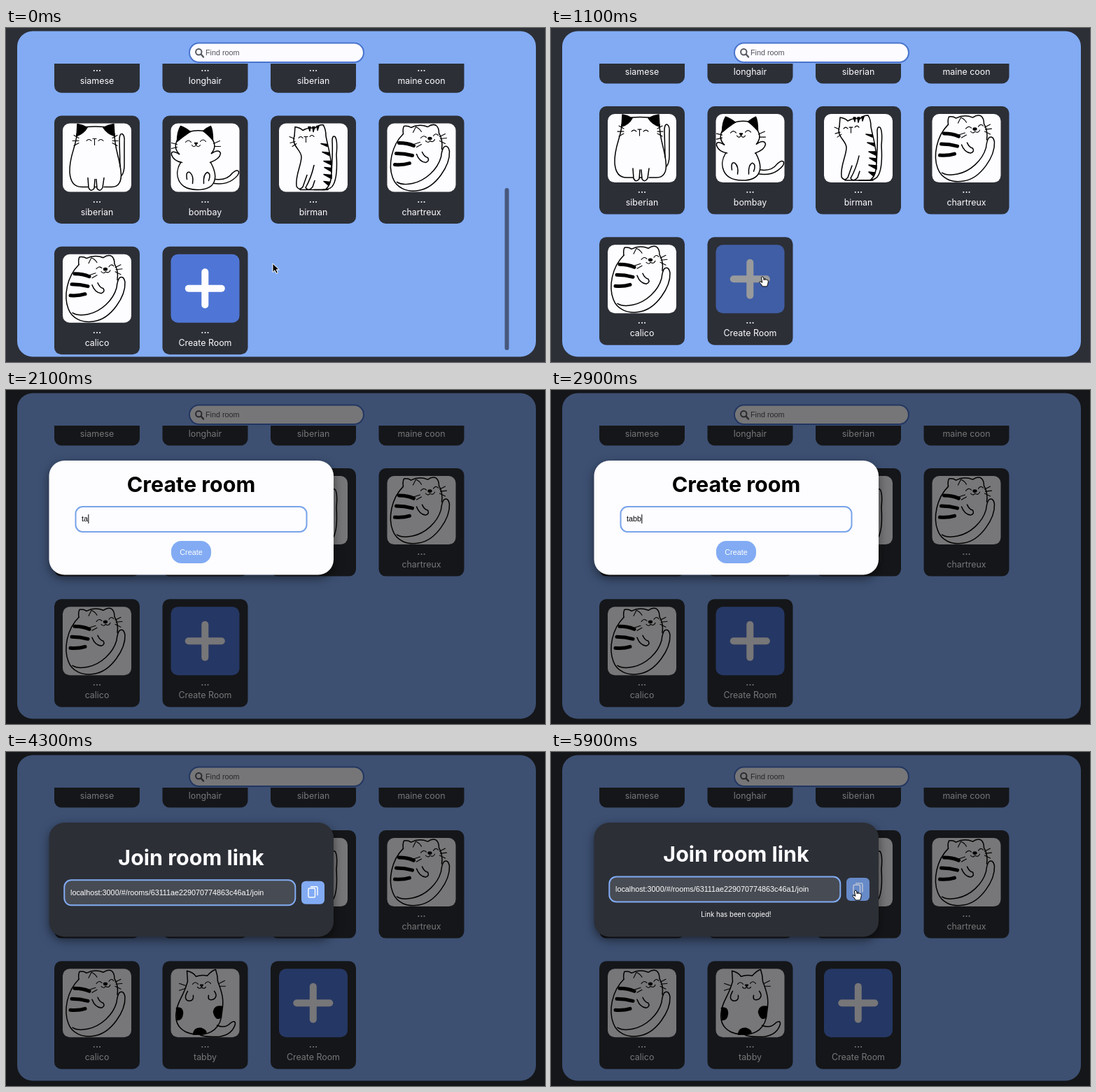
An HTML page that plays this animation: 770 px wide and 478 px high, repeating every 6 s.

```html
<!DOCTYPE html>
<html lang="en">
<head>
<meta charset="utf-8">
<title>Create room</title>
<style>
  html, body { margin: 0; width: 100%; height: 100%; overflow: hidden; background: #2c2f36; }
  svg { display: block; width: 770px; height: 478px; }
  text { white-space: pre; }
  .label { font: 400 12.4px Inter, sans-serif; fill: #fcfcff; text-anchor: middle; }
  .dots { font-weight: 700; }
  .title { font: 700 30.5px Inter, sans-serif; text-anchor: middle; }
  .field { font: 10.8px "Liberation Sans", Arial, sans-serif; }
  .note { font: 9.7px Inter, sans-serif; fill: #fff; text-anchor: middle; }
  .mid { text-anchor: middle; }
  .ink { fill: none; stroke: #000; stroke-width: 1.5; stroke-linecap: round; stroke-linejoin: round; }
  .ink .solid { fill: #000; }
  .ink .band { stroke-width: 5; }
  .ink .thin { stroke-width: 1.1; }
  .shadow { filter: drop-shadow(0 5px 7px rgba(0, 0, 0, .5)); }
</style>
</head>
<body>
<svg id="stage" viewBox="0 0 770 478" xmlns="http://www.w3.org/2000/svg"></svg>
<script>
const BLUE = '#82abf4', DARK = '#2c2f36', WHITE = '#fdfcff';
const stage = document.getElementById('stage');

const line = (d, cls = '') => `<path class="${cls}" d="${d}"/>`;
const rect = (x, y, w, h, r, fill, extra = '') =>
  `<rect x="${x}" y="${y}" width="${w}" height="${h}" rx="${r}" fill="${fill}" ${extra}/>`;
const text = (x, y, cls, str, extra = '') =>
  `<text x="${x}" y="${y}" class="${cls}" ${extra}>${str}</text>`;

// Drawings live in a 98 x 98 tile.
const cats = {
  sitting:
    line('M20 15C20 32 9 46 10 70C11 84 17 91 27 91H36M59 91H70C80 91 85 83 83 68C81 48 74 36 74 15M34 5Q46 4 59 5') +
    line('M20 18L21 1Q28 2 35 6Q30 15 20 18ZM74 18L73 1Q66 2 58 6Q64 15 74 18Z', 'solid') +
    line('M36 78L37 92Q40 99 45 93L46 80M48 80L49 93Q53 99 57 92L59 78M46 91H49') +
    line('M82 62L81 24Q81 14 85 15Q89 17 88 28V60Q88 70 84 75') +
    line('M34 25q3.5-4 7 0M51 25q3.5-4 7 0M43 22h5M45.5 22v9M23 21l-7-4M23 25h-9M23 28l-7 4M71 21l7-4M71 25h8M71 28l7 4', 'thin'),
  waving:
    line('M9 24C4 34 8 40 12 44M60 24C65 32 62 38 58 43M26 12Q36 9 48 11') +
    line('M9 26Q9 12 14 4Q22 7 28 12Q22 15 9 26ZM60 24Q60 10 57 4Q52 6 46 11Q52 15 60 24Z', 'solid') +
    line('M12 44Q0 37 1 45Q4 54 16 56M58 43Q69 36 71 43Q70 51 56 56') +
    line('M14 56C4 72 9 95 38 95C64 95 69 78 57 56') +
    line('M23 80Q21 68 27 70Q33 75 31 86M47 86Q46 73 52 70Q58 72 54 82') +
    line('M64 80Q80 82 88 71Q95 65 97 69Q98 74 88 81Q78 88 62 86') +
    line('M21 27q4-5 8 0M42 26q4-5 8 0M30 31q3 4.5 6 0q3 4.5 6 0M9 30l-8-2M9 34l-8 2M61 29l9-4M62 33h9', 'thin') +
    line('M34 28h4l-2 2.5Z', 'solid'),
  standing:
    line('M22 18L23 5Q30 6 34 10Q42 5 51 7Q56 2 63 2Q67 8 67 18C70 35 76 50 75 70Q75 88 66 95H50') +
    line('M22 18C17 32 32 38 32 48C32 60 23 74 25 90Q29 97 34 91L40 74M50 60Q46 78 38 92Q42 98 48 91L51 82M30 95H70') +
    line('M75 70Q77 40 76 25Q76 17 80 19Q84 24 82 45Q84 75 78 87Q75 95 62 95') +
    line('M42 5h3l-1 6ZM48 5h3l-2 7ZM54 4h3l-2 6Z', 'solid') +
    line('M69 30l-9-1l9 4ZM72 42l-10-1l10 5ZM74 54l-10 0l10 5ZM75 64l-10-1l10 6ZM75 74l-11-1l11 6ZM73 84l-9-1l7 6Z', 'solid') +
    line('M28 21q3-4 6 0M44 19q3-4 6 0M36 19h5M38.5 19v8M22 22l-7-3M23 26l-7 2M25 29l-6 4', 'thin'),
  curled:
    line('M23 15C6 32 1 60 8 78C13 92 28 99 45 96C70 92 90 60 89 40Q87 30 81 34Q78 38 77 48C72 66 55 82 36 86Q22 89 14 84') +
    line('M23 15Q22 8 24 4Q30 3 34 6Q46 0 58 5Q65 0 70 3Q74 6 74 14C79 22 79 30 78 37') +
    line('M42 44Q46 55 55 56Q61 54 58 49Q53 48 50 41') +
    line('M37 13l4-8q5 2 8 7M48 21q4-5 8-1M66 18q3-5 7-1M55 25q4 4 6 0q5 3 7-2M75 19l8-4M76 22l9-1M75 25l8 4M47 27l-9 3M49 30l-7 4', 'thin') +
    `<ellipse class="solid" cx="61" cy="21.5" rx="2.4" ry="1.6"/>` +
    line('M17 28Q29 28 38 32M13 43Q25 43 36 46M11 59Q23 60 32 57', 'band'),
  patched:
    line('M24 18L23 3Q32 5 36 11Q44 8 52 10Q58 3 64 1Q67 10 67 18C74 36 76 45 73 62C72 86 56 94 40 94C16 94 4 80 8 60C10 45 18 40 24 18') +
    line('M8 56Q17 54 17 64Q16 74 9 73ZM73 54Q62 52 61 62Q64 74 71 70ZM32 94Q33 84 43 85Q52 88 50 93Z', 'solid') +
    line('M24 32Q17 44 26 46Q33 46 32 38M54 38Q52 46 60 44Q68 40 62 32') +
    line('M66 81Q78 86 86 77Q92 73 92 79Q88 94 70 97Q46 98 41 94') +
    line('M31 22q4-5 8 0M49 21q4-5 8 0M38 26q3 4 6 0q3 4 6 0M21 24l-9-3M21 28l-9 3M69 21l8-4M70 25h8', 'thin') +
    line('M42 23h4l-2 2.5Z', 'solid')
};

const card = (col, row, name, art) =>
  `<g transform="translate(${69 + 154.5 * col} ${-61.7 + 187.2 * row})">
    ${rect(0, 0, 122, 154.5, 10, DARK)}
    <g transform="translate(12 11)">${art}</g>
    ${text(61, 124, 'label dots', '...')}${text(61, 142, 'label', name)}
  </g>`;
const room = (col, row, name, cat) =>
  card(col, row, name, rect(0, 0, 98, 98, 10, WHITE) + `<g class="ink">${cats[cat]}</g>`);
const adder = col => card(col, 2, 'Create Room',
  `<g class="add" fill="${WHITE}">${rect(0, 0, 98, 98, 10, '#4f76d6', 'class="tile"')}
   ${rect(20.3, 44, 57, 10, 5, 'inherit')}${rect(43.8, 20.5, 10, 57, 5, 'inherit')}</g>`);

const rooms = [
  ['siamese', 'sitting'], ['longhair', 'waving'], ['siberian', 'standing'], ['maine coon', 'curled'],
  ['siberian', 'sitting'], ['bombay', 'waving'], ['birman', 'standing'], ['chartreux', 'curled'],
  ['calico', 'curled']
].map(([name, cat], i) => room(i % 4, Math.floor(i / 4), name, cat)).join('');

stage.innerHTML = `
  <clipPath id="view"><rect x="16" y="51" width="741" height="419.5"/></clipPath>
  ${rect(0, 0, 770, 478, 0, DARK)}
  ${rect(16, 4.5, 741, 466, 22, BLUE)}
  <g clip-path="url(#view)"><g id="list">
    ${rooms}
    <g id="before">${adder(1)}</g>
    <g id="after">${room(1, 2, 'tabby', 'patched')}${adder(2)}</g>
  </g></g>
  ${rect(712.5, 229, 6, 232, 3, '#48587c', 'id="bar"')}
  ${rect(262, 21.5, 249, 27.5, 13.7, '#fcfbff', 'stroke="#4a74cc" stroke-width="2"')}
  <path d="M279 38l3 3.5" stroke="#555860" stroke-width="2.4" stroke-linecap="round"/>
  <circle cx="275.3" cy="34.3" r="4.2" fill="none" stroke="#555860" stroke-width="2"/>
  ${text(285, 39, 'field', 'Find room', 'fill="#50535a"')}
  ${rect(0, 0, 770, 478, 0, '#000', 'id="dim" opacity=".53"')}

  <g id="create">
    ${rect(61.5, 101, 406.5, 163.5, 22, '#fdfcfe', 'class="shadow"')}
    ${text(264.5, 146, 'title', 'Create room')}
    ${rect(99.5, 167, 330, 36, 10, '#fdfcff', 'stroke="#78a4ea" stroke-width="2"')}
    ${text(108, 188.3, 'field', '', 'id="entry"')}
    ${rect(0, 178, 1, 13, 0, '#000', 'id="caret"')}
    ${rect(236, 216, 57, 32, 14.5, BLUE, 'id="send"')}
    ${text(264.5, 235.8, 'field mid', 'Create', 'id="sendText"')}
  </g>

  <g id="join">
    ${rect(61.5, 101, 406.5, 163.5, 22, DARK, 'class="shadow"')}
    <g id="link">
      ${text(264.5, 162, 'title', 'Join room link', `fill="${WHITE}"`)}
      ${rect(83.3, 183.3, 330, 36, 10, '#474b53', `stroke="${BLUE}" stroke-width="2"`)}
      ${text(92, 205, 'field', 'localhost:3000/#/rooms/63111ae229070774863c46a1/join', 'fill="#fff"')}
      ${rect(422, 184.7, 33, 33, 6, BLUE, 'id="copy"')}
      <g id="copyIcon" fill="none" stroke="#fff" stroke-width="1.4" stroke-linejoin="round">
        <rect x="432" y="195" width="9.5" height="13" rx="1.5"/>
        <path d="M435 192.7h8.500q1.500 0 1.500 1.500v11"/>
      </g>
    </g>
    ${text(264.5, 235.7, 'note', 'Link has been copied!', 'id="note"')}
  </g>

  <g id="cursor" stroke-linejoin="round">
    <path id="arrow" d="M0 0V12.500L3 9.700L5 14.300L7.300 13.300L5.300 8.800H9.200Z" fill="#000" stroke="#fff"/>
    <path id="hand" d="M-1.500 1Q0-1 1.500 1L2.300 5Q4-.0 4 4.500Q6 3 6.500 5Q8.500 4 8.300 7.500Q8 11 6.500 14H0Q-1 11-4 8.500Q-4.500 6.300-2 7.200L-.3 8.500Z"
      fill="#fff" stroke="#000"/>
  </g>`;

const el = id => document.getElementById(id);
const show = (id, on) => { el(id).style.display = on ? '' : 'none'; };

// [time, x, y]
const path = [
  [0, 381, 337], [500, 381, 337], [700, 364, 341], [900, 317, 354], [1000, 302, 356],
  [4600, 302, 352], [4700, 308, 347], [4800, 344, 302], [4900, 390, 234],
  [5000, 416, 190], [5100, 428, 192], [5200, 435, 198], [6000, 435, 198]
];
const typed = [[3400, 'tabby'], [2700, 'tabb'], [2300, 'tab'], [2000, 'ta'], [1600, 't'], [0, '']];

function pointer(t) {
  const i = path.findIndex(p => p[0] > t);
  const [t0, x0, y0] = path[i - 1], [t1, x1, y1] = path[i];
  const k = (t - t0) / (t1 - t0);
  return [x0 + (x1 - x0) * k, y0 + (y1 - y0) * k];
}

function draw(t) {
  const joined = t >= 4300, open = t >= 1200, copied = t >= 5400;

  const scroll = t >= 100;
  el('list').setAttribute('transform', `translate(0 ${scroll ? -13.4 : 0})`);
  el('bar').setAttribute('y', scroll ? 236 : 229);
  el('bar').setAttribute('opacity', Math.max(0, Math.min(1, (1000 - t) / 400)));

  show('before', !joined);
  show('after', joined);
  show('dim', open);
  show('create', open && !joined);
  show('join', joined);

  const word = typed.find(step => t >= step[0])[1];
  const entry = el('entry');
  entry.textContent = word || 'What would you like to name your room?';
  entry.setAttribute('fill', word ? '#000' : '#55585f');
  show('caret', word);
  if (word && !joined) el('caret').setAttribute('x', 108.3 + entry.getComputedTextLength());
  el('send').setAttribute('fill', word ? BLUE : '#e8e8eb');
  el('sendText').setAttribute('fill', word ? '#fff' : '#55585f');

  const [x, y] = pointer(t);
  const onAdd = !open && x < 334, onCopy = t >= 5100;
  const add = document.querySelector('#before .add');
  add.setAttribute('fill', onAdd ? '#999a9c' : WHITE);
  add.querySelector('.tile').setAttribute('fill', onAdd ? '#405ea6' : '#4f76d6');

  el('link').setAttribute('transform', `translate(0 ${copied ? -4.8 : 0})`);
  el('copy').setAttribute('fill', onCopy ? '#678ac8' : BLUE);
  el('copyIcon').setAttribute('stroke', onCopy ? '#c3c8d2' : '#fff');
  show('note', copied);

  show('cursor', t < 1600 || t >= 4700);
  show('hand', onAdd || onCopy);
  show('arrow', !(onAdd || onCopy));
  el('cursor').setAttribute('transform', `translate(${x} ${y})`);
}

const start = performance.now();
function tick() {
  const t = (performance.now() - start) % 6000;
  draw(Math.floor(t / 100) * 100);
  requestAnimationFrame(tick);
}
tick();
</script>
</body>
</html>
```
